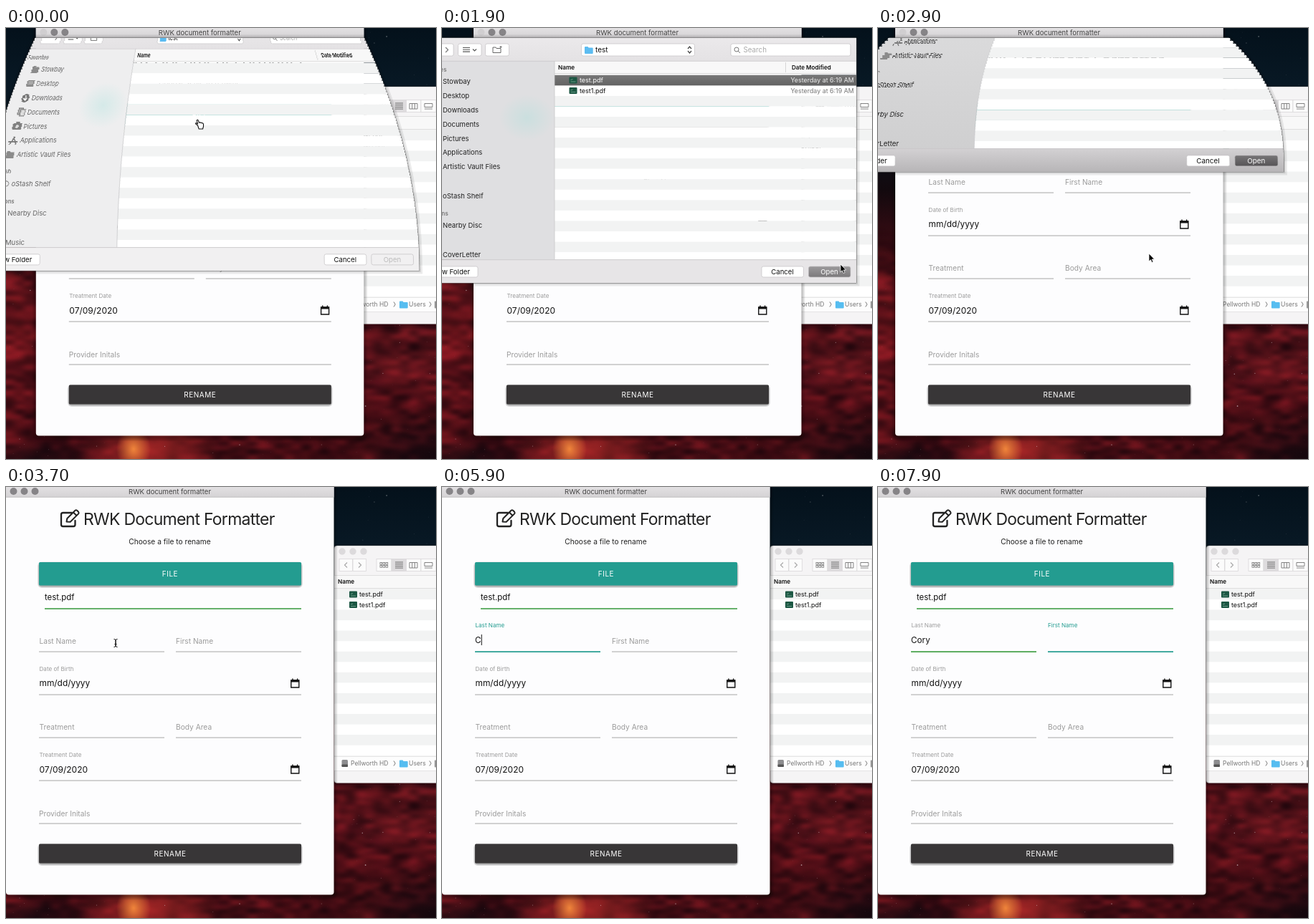
These frames come from a looping animation (600 by 602 pixels, 8000 ms). An HTML page with a canvas:

```html
<!DOCTYPE html>
<html lang="en">
<head>
<meta charset="utf-8">
<title>Document formatter</title>
<style>
html, body { margin: 0; width: 100%; height: 100%; overflow: hidden; background: #12090e; }
#sky, #stage { position: absolute; left: 0; top: 0; width: 600px; height: 602px; }
text { font-family: Inter, "Open Sans", sans-serif; white-space: pre; }
</style>
</head>
<body>
<canvas id="sky" width="600" height="602"></canvas>
<svg id="stage" viewBox="0 0 600 602"></svg>
<script>
const LOOP = 8000, STEP = 100, TOP = 14, SHEET_H = 342, SHEET_X = -33, SHEET_W = 611, STRIP = 4, SHIFT = 44;
const TEAL = '#239c90', GREEN = '#43a047', GREY = '#9b9b9b', INK = '#111';

const $ = id => document.getElementById(id);
const range = n => [...Array(n).keys()];
const rect = (x, y, w, h, fill, more = '') =>
  `<rect x="${x}" y="${y}" width="${w}" height="${h}" fill="${fill}" ${more}/>`;
const text = (x, y, s, size, fill = INK, more = '') =>
  `<text x="${x}" y="${y}" font-size="${size}" fill="${fill}" ${more}>${s}</text>`;
const path = (d, stroke, width = 1, more = '') =>
  `<path d="${d}" fill="none" stroke="${stroke}" stroke-width="${width}" ${more}/>`;
const circle = (x, y, r, fill, more = '') => `<circle cx="${x}" cy="${y}" r="${r}" fill="${fill}" ${more}/>`;
const gradient = (id, ...stops) => `<linearGradient id="${id}" x2="0" y2="1">` +
  stops.map((c, i) => `<stop offset="${i / (stops.length - 1)}" stop-color="${c}"/>`).join('') + '</linearGradient>';
const shade = (x, y, w, h, spread, alpha) => range(spread).map(i =>
  rect(x - i, y - i + spread / 2, w + 2 * i, h + 2 * i, '#000', `rx="${4 + i}" opacity="${alpha}"`)).join('');
const MIDDLE = 'text-anchor="middle"', BOLD = 'font-weight="600"';

const stripes = (x, y, w, bottom) => range(Math.ceil((bottom - y) / 14.55)).map(i => {
  const top = y + i * 14.55;
  return rect(x, top, w, Math.min(14.55, bottom - top), i % 2 ? '#fff' : '#f2f3f3');
}).join('');
const fileIcon = (x, y) => rect(x, y, 11, 9, '#1c5743', 'rx="1"') +
  path(`M${x + 2} ${y + 6.5}h7M${x + 2} ${y + 4}l3 -1`, '#7cab98', .8);
const folder = (x, y, fill) =>
  `<path d="M${x} ${y + 1}q0 -1 1 -1h3.5l1.2 1.5h5q1 0 1 1v6.5q0 1 -1 1h-9.7q-1 0 -1 -1z" fill="${fill}"/>`;
const chevron = (x, y, dx, color, w = 1.2) => path(`M${x} ${y - 3.5}l${dx} 3.5l${-dx} 3.5`, color, w);

function drawSky() {
  const ctx = $('sky').getContext('2d');
  let seed = 11;
  const rnd = () => (seed = seed * 16807 % 2147483647) / 2147483647;

  const space = ctx.createLinearGradient(0, 0, 0, 602);
  const tones = ['#04111b', '#081824', '#0b141d', '#12090e', '#3a0c13', '#6d1520', '#74141f', '#5b101a', '#380b13'];
  tones.forEach((c, i) => space.addColorStop(i / (tones.length - 1), c));
  ctx.fillStyle = space;
  ctx.fillRect(0, 0, 600, 602);

  const glow = (x, y, rx, ry, rgb, alpha) => {
    const g = ctx.createRadialGradient(0, 0, 0, 0, 0, 1);
    g.addColorStop(0, `rgba(${rgb},${alpha})`);
    g.addColorStop(1, `rgba(${rgb},0)`);
    ctx.save();
    ctx.translate(x, y);
    ctx.scale(rx, ry);
    ctx.fillStyle = g;
    ctx.fillRect(-1, -1, 2, 2);
    ctx.restore();
  };
  // Random cells, enlarged smoothly, make one octave of cloud.
  const cloud = (cells, rgb, alpha, top) => {
    const tile = document.createElement('canvas');
    tile.width = tile.height = cells;
    const c = tile.getContext('2d');
    for (let y = 0; y < cells; y++) for (let x = 0; x < cells; x++) {
      c.fillStyle = `rgba(${rgb},${(rnd() ** 1.5 * alpha * Math.min(1, 5 * y / cells)).toFixed(3)})`;
      c.fillRect(x, y, 1, 1);
    }
    ctx.imageSmoothingQuality = 'high';
    ctx.drawImage(tile, 0, top, 600, 602 - top);
  };
  glow(555, 450, 130, 75, '150,48,58', .6);
  glow(20, 400, 90, 90, '190,40,42', .45);
  for (const cells of [10, 22, 48]) {
    cloud(cells, '185,36,46', .4, 300);
    cloud(cells, '12,3,8', .6, 270);
  }
  glow(600, 600, 120, 80, '12,7,13', .8);
  glow(40, 602, 100, 30, '12,7,13', .8);
  glow(200, 590, 100, 48, '209,50,47', .7);
  glow(178, 588, 24, 30, '245,138,60', .95);
  for (let i = 0; i < 420; i++) {
    ctx.fillStyle = `rgba(229,223,227,${.15 + rnd() * .6})`;
    ctx.beginPath();
    ctx.arc(rnd() * 600, rnd() * 602, .25 + rnd() ** 5 * .8, 0, 7);
    ctx.fill();
  }
}

function finder() {
  const tool = (x, w, on) => rect(x, 100.5, w, 17, on ? '#dedcde' : '#fbfbfb', 'stroke="#dad8da" stroke-width=".8"');
  return `${shade(458, 82, 160, 331, 6, .06)}
    ${rect(458, 82, 160, 331.5, '#f5f4f5', 'rx="4" stroke="#888" stroke-width=".4"')}
    ${[469, 484, 499].map(x => circle(x, 90, 4.7, '#dcdadc')).join('')}
    ${tool(465, 18.5)}${tool(484, 18.5)}${tool(517, 21)}${tool(538, 20.5, true)}${tool(558.5, 20.5)}${tool(579, 21)}
    ${chevron(476, 109, -3.5, '#aaa')}${chevron(492, 109, 3.5, '#aaa')}
    ${range(6).map(i => rect(522 + i % 3 * 4, 105.5 + (i / 3 | 0) * 4, 2.7, 2.7, 'none', 'stroke="#777" stroke-width=".8"')).join('')}
    ${path('M543 105h11M543 107.7h11M543 110.4h11M543 113h11', '#666')}
    ${path('M563 105.5h11v7.5h-11zM566.7 105.5v7.5M570.4 105.5v7.5', '#777', .9)}
    ${path('M584 105.5h11v5h-11zM584 113h11', '#777', .9)}
    ${rect(458, 123, 142, 18.5, '#f8f8f8')}${path('M458 123.5h142M458 141.5h142', '#d5d5d5', .7)}
    ${text(463, 135, 'Name', 8.2, INK, BOLD)}
    ${stripes(458, 142.5, 142, 376)}
    ${fileIcon(479, 145.5)}${fileIcon(479, 160)}
    ${text(493, 153.3, 'test.pdf', 9)}${text(493, 167.8, 'test1.pdf', 9)}
    ${rect(458, 376, 142, 20, '#fdfdfd')}${path('M458 376.5h142M458 396.5h142', '#ddd', .7)}
    ${rect(468.5, 381, 8.5, 10, '#8d8d8f', 'rx="1.5"')}${rect(468.5, 387.5, 8.5, 3.5, '#555', 'rx="1"')}
    ${text(481, 389.3, 'Pellworth HD', 8.5, '#777')}${chevron(541, 386, 2.2, '#777', 1)}
    ${folder(549, 381.5, '#56bdf0')}${text(562, 389.3, 'Users', 8.6, '#777')}${chevron(591, 386, 2.2, '#777', 1)}
    ${folder(598, 381.5, '#999')}`;
}

const calendar = y => `<g transform="translate(397 ${y})">${path('M.8 2.5h11v10h-11z', INK, 1.4)}
  ${rect(.5, 2, 11.6, 3, INK)}${path('M3 0v3M9.6 0v3', INK, 1.4)}</g>`;

function formWindow() {
  const line = (x, w, y, id = '') => rect(x, y - .4, w, .9, GREY, id && `id="${id}"`);
  const hint = (x, y, s, more) => text(x, y, s, 10.2, GREY, more);
  const label = (y, s) => text(46.5, y, s, 8.1, GREY);
  const button = (y, h, fill, s) => shade(46, y, 366, h, 3, .12) + rect(46, y, 366, h, fill, 'rx="1.5"') +
    text(229, y + h / 2 + 3.6, s, 10, '#fff', MIDDLE + ' letter-spacing=".5"');
  return `<g id="win">${shade(0, -6, 457.5, 575, 6, .06)}${rect(0, -6, 457.5, 575.5, '#fdfdfe', 'rx="4"')}
    ${rect(0, -1, 457.5, 15, 'url(#bar)')}${path('M0 14.2h457.5', '#b4b2b4', .8)}
    ${circle(10.5, 6, 5, '#868487', 'id="closeDot"')}${circle(25.5, 6, 5, '#868487')}${circle(40.5, 6, 5, '#868487')}
    ${text(228.5, 9.7, 'RWK document formatter', 9.6, '#444', MIDDLE)}
    ${path('M92 36H79.5q-2.5 0 -2.5 2.5v14q0 2.5 2.5 2.5h14.5q2.5 0 2.5 -2.5V47', '#222', 2.3, 'stroke-linecap="round"')}
    ${path('M84.5 48.5l.8 -4.5 11.2 -11.2q1.3 -1 2.6 0l2 2q1 1.3 0 2.6l-11.4 11.3zM94 35.5l4.5 4.5', '#222', 2, 'stroke-linejoin="round"')}
    ${text(108, 52.5, 'RWK Document Formatter', 23, '#222', 'letter-spacing="-.75"')}
    ${text(228.5, 80, 'Choose a file to rename', 10.2, '#222', MIDDLE)}
    ${button(105, 32.5, TEAL, 'FILE')}
    ${text(54, 157.5, 'test.pdf', 11.4, INK, 'id="fileName"')}${rect(54, 169.2, 358, 1.6, GREEN, 'id="fileLine"')}
    ${hint(46.5, 219, 'Last Name', 'id="lastLabel"')}${line(46, 175, 230, 'lastLine')}${text(46, 217.8, '', 11.7, INK, 'id="lastValue"')}
    ${hint(237, 219, 'First Name', 'id="firstLabel"')}${line(237, 175, 230, 'firstLine')}
    ${rect(46, 206, 1, 15, INK, 'id="caret"')}
    ${label(257, 'Date of Birth')}${text(46.5, 278.3, 'mm/dd/yyyy', 11.9)}${calendar(267.5)}${line(46, 366, 290)}
    ${hint(46.5, 339.3, 'Treatment')}${line(46, 175, 350)}${hint(237, 339.3, 'Body Area')}${line(237, 175, 350)}
    ${label(377.3, 'Treatment Date')}${text(46.5, 398.5, '07/09/2020', 12)}${calendar(387.5)}${line(46, 366, 410)}
    ${hint(46, 459.5, 'Provider Initals')}${line(46, 366, 470)}
    ${button(498.5, 27, '#383637', 'RENAME')}</g>`;
}

function sheet() {
  const key = (x, y, w, h, more = '') => rect(x, y, w, h, '#fff', `rx="2.5" stroke="#c3c1c3" stroke-width=".7" ${more}`);
  const places = ['Stowbay', 'Desktop', 'Downloads', 'Documents', 'Pictures', 'Applications', 'Artistic Vault Files'];
  const place = (y, s, more = '') => text(1, y + 3.3, s, 9.5, 'inherit', more);
  const head = (x, y, s) => text(x, y + 3, s, 8.2, '#777', BOLD);
  const icons = [folder(-15, 70, '#8b8b8b'),
    rect(-15, 90, 12, 9, '#8b8b8b', 'rx="1"') + path('M-13 92.5h8M-13 95h8', '#eee', .8),
    circle(-9, 115, 6, '#777') + path('M-9 111v7M-12 115l3 3 3 -3', '#fff', 1.4),
    rect(-14, 129, 7, 9, '#aaa', 'stroke="#777"') + rect(-10, 131, 7, 9, '#ddd', 'stroke="#777"'),
    rect(-16, 150, 14, 9, '#808080', 'rx="1.5"') + rect(-12, 148, 6, 4, '#808080') + circle(-9, 154.5, 2.5, '#ddd'),
    path('M-14 180l6 -11M-4 180l-6 -11M-16 176h14', '#777', 1.6), folder(-15, 189, '#8b8b8b'),
    path('M-13 238q-3 0 -3 -3t4 -3q2 -4 5 -1q4 0 4 4q0 3 -3 3z', '#888')].join('');
  const row = ([s, y], i) => fileIcon(177.5, y - 4.5) + text(192, y + 3.3, s, 9, INK, `id="name${i}"`) +
    text(486.5, y + 3.3, 'Yesterday at 6:19 AM', 8.9, '#777', `id="when${i}"`);
  return `<svg id="sheet" x="${SHEET_X}" y="${TOP}" width="${SHEET_W}" height="${SHEET_H}" viewBox="${SHEET_X} ${TOP} ${SHEET_W} ${SHEET_H}">
    ${rect(SHEET_X, TOP, SHEET_W, 32, 'url(#tools)')}
    ${key(-20, 22, 36, 17)}${chevron(5, 30.5, 3.5, '#777')}
    ${key(22.5, 22, 32.5, 17)}${path('M29 27.5h10M29 30.3h10M29 33.1h10M43 29.5l2.5 2.5 2.5 -2.5', '#555', 1.1)}
    ${key(60.5, 22, 33, 17)}${path('M71 27h4l1 1.5h6v6h-11zM82 25v3M80.5 26.5h3', '#666')}
    ${key(194.5, 22, 158, 17)}${folder(199, 26, '#5cbcf1')}${text(214, 34, 'test', 10)}
    ${path('M343 29l2.5 -3 2.5 3M343 32l2.5 3 2.5 -3', '#444', 1.2)}
    ${key(403, 22, 167, 17)}${circle(411, 30, 3, 'none', 'stroke="#777"')}${path('M413 32l3 3', '#777')}${text(420.5, 34, 'Search', 9.8, '#aaa')}
    ${rect(SHEET_X, 46, 190, 277.5, '#dfdfe1', 'id="side"')}${rect(80, 93, 77, 64, 'url(#tint)')}
    ${head(-30, 58, 'Favorites')}${head(-30, 217, 'oStash')}${head(-30, 259, 'Locations')}${icons}
    <g id="places">${places.map((s, i) => place(75 + i * 19.83, s)).join('')}
    ${place(235, 'oStash Shelf')}${place(276, 'Nearby Disc')}${place(317, 'CoverLetter', 'id="lastPlace"')}</g>
    ${rect(157, 46, 421, 19.5, '#f8f8f8')}${path('M157 63.5h421', '#d0d0d0', .7)}${path('M479.5 48v14', '#ccc', .8)}
    ${path(`M${SHEET_X} 46.3h${SHEET_W}`, '#c9c7c9', .8)}
    ${text(162, 58.2, 'Name', 8.2, INK, BOLD)}${text(488, 58.2, 'Date Modified', 8.1, INK, BOLD)}
    ${stripes(157, 65.8, 421, 323.5)}${rect(157, 65.8, 421, 14.5, 'url(#picked)', 'id="pick"')}
    <g id="files">${[['test.pdf', 73], ['test1.pdf', 87.5]].map(row).join('')}</g>
    ${path('M157 46v277.5', '#c8c8ca', .8)}
    ${rect(SHEET_X, 323.5, SHEET_W, 32.5, '#e7e5e7', 'id="foot"')}${path(`M${SHEET_X} 323.7h${SHEET_W}`, '#c4c2c4', .8)}
    ${key(-22, 333, 72, 15)}${text(39, 344, 'New Folder', 9.6, INK, 'text-anchor="end"')}
    ${key(446, 333, 58.5, 15)}${text(475, 344, 'Cancel', 9.6, INK, MIDDLE)}
    ${key(511.5, 333, 58.5, 15, 'id="openKey"')}${text(540.5, 344, 'Open', 9.6, '#bbb', MIDDLE + ' id="openText"')}</svg>`;
}

function build() {
  $('stage').innerHTML = `<defs>
    ${gradient('bar', '#e3e1e3', '#d5d3d5')}${gradient('tools', '#ebe9eb', '#e4e2e4')}${gradient('picked', '#777', '#636363')}
    ${gradient('keyOn', '#9b999b', '#7b797b')}${gradient('keyDown', '#777577', '#565456')}
    ${gradient('footDark', '#d3d1d3', '#b7b5b7')}${gradient('sideDark', '#dededf', '#d9d9da', '#cfcfd0')}
    <radialGradient id="tint"><stop stop-color="#9adfd9" stop-opacity=".3"/><stop offset="1" stop-color="#9adfd9" stop-opacity="0"/></radialGradient></defs>
    ${finder()}${formWindow()}
    <g id="edge">${path('', '#000', 9, 'opacity=".08"')}${path('', '#000', 4, 'opacity=".12"')}${path('', '#777', 1)}</g>
    ${sheet()}<g id="warp"></g>
    <g id="hand"><path d="M2.5 8L.3 6.5Q-1.2 5 .3 4.6L2.6 6 1.2 1.6Q1.3 -.3 3 .6L4.5 4.3Q6 3.3 6.8 4.5 8 3.8 8.7 5 10.3 4.5 10.5 6.5V9.5L9.5 13H4.2Z" fill="#fff" stroke="#111" stroke-width="1.1" stroke-linejoin="round"/></g>
    <g id="arrow"><path d="M0 0V11L2.5 8.7 4.2 12.5 6 11.7 4.4 8H7.7Z" fill="#000" stroke="#fff" stroke-width=".8"/></g>
    <g id="beam">${path('M-2.5 -5.5q2.5 0 2.5 1.5v8q0 1.5 -2.5 1.5M2.5 -5.5q-2.5 0 -2.5 1.5v8q0 1.5 2.5 1.5M-1.5 1.5h3', INK)}</g>`;
}

const set = (id, attrs) => {
  for (const k in attrs) {
    const value = String(attrs[k]);
    if ($(id).getAttribute(k) !== value) $(id).setAttribute(k, value);
  }
};
const show = (id, on) => set(id, { display: on ? 'inline' : 'none' });
const ramp = (t, from, length) => Math.min(1, Math.max(0, (t - from) / length));
const ease = u => u * u * (3 - 2 * u);
const mix = (a, b, u) => a + (b - a) * u;

const CLOSE = 2764, FOCUS_LAST = 4000, FOCUS_FIRST = 7400;
const NAME = 'Cory', KEYS = [5900, 6300, 6700, 7100];
const TRACK = [[0, 265, 128], [200, 265, 128], [900, 222, 72], [1350, 222, 72], [1800, 556, 330],
  [2450, 556, 330], [2900, 378, 315], [3500, 153, 218], [LOOP, 153, 218]];

function pointer(t) {
  const i = TRACK.findIndex(k => k[0] > t), a = TRACK[i - 1], b = TRACK[i];
  const u = ease((t - a[0]) / (b[0] - a[0]));
  return [mix(a[1], b[1], u), mix(a[2], b[2], u)];
}

// The sheet slides out of the title bar, pinched to the window width at its top.
function drawSheet(open) {
  const hidden = 1 - open, bottom = TOP + SHEET_H * open, cx = 228.5 + SHIFT * open;
  const half = y => {
    const u = Math.min(1, (y - TOP) / (bottom - TOP));
    const flare = 1 - (1 - u) ** (1.9 + 1.6 * hidden);
    return SHEET_W / 2 * (open === 1 ? 1 : mix(.748 + .06 * hidden, 1 + .06 * hidden, flare));
  };
  show('sheet', open === 1);
  show('edge', open > 0);
  $('warp').innerHTML = '';
  if (open === 0) return;
  const ys = range(25).map(i => mix(TOP, bottom, (i / 24) ** 2));
  const sides = [...ys.map(y => [cx + half(y), y]), ...ys.reverse().map(y => [cx - half(y), y])];
  for (const p of $('edge').children) p.setAttribute('d', `M${sides.join('L')}z`);
  if (open === 1) return;

  const pieces = $('sheet').innerHTML.replace(/ id="[^"]*"/g, '');
  $('warp').innerHTML = `<defs><g id="pieces">${pieces}</g></defs>` + range(Math.ceil((bottom - TOP) / STRIP)).map(i => {
    const y = TOP + i * STRIP, h = Math.min(STRIP, bottom - y), w = half(y + h / 2);
    return `<svg x="${cx - w}" y="${y}" width="${2 * w}" height="${h}" preserveAspectRatio="none"
      viewBox="${SHEET_X} ${y + SHEET_H * hidden} ${SHEET_W} ${h}"><use href="#pieces"/></svg>`;
  }).join('');
}

function drawField(id, u, color, lineColor) {
  set(id + 'Label', { y: mix(219, 196.3, u), 'font-size': mix(10.2, 8.1, u), fill: color });
  set(id + 'Line', { y: u ? 229.3 : 229.6, height: u ? 1.7 : .9, fill: lineColor });
}

let shownOpen = -1;
function draw(t) {
  const open = t < CLOSE ? mix(.95, 1, ramp(t, 0, 100)) : 1 - ease(ramp(t, CLOSE, 290));
  const fresh = t < 100, picked = t >= 1250, closing = t >= CLOSE;
  set('win', { transform: `translate(${SHIFT * open})` });
  set('closeDot', { fill: open > 0 ? '#d0ced0' : '#868487' });

  show('files', t >= 150);
  show('pick', picked);
  set('name0', { fill: picked ? '#fff' : INK });
  set('when0', { fill: picked ? '#eee' : '#777' });
  set('side', { fill: fresh ? '#eeeeef' : closing ? 'url(#sideDark)' : '#dfdfe1' });
  set('foot', { fill: fresh ? '#f1f0f1' : closing ? 'url(#footDark)' : '#e7e5e7' });
  set('openKey', { fill: closing ? 'url(#keyDown)' : picked ? 'url(#keyOn)' : '#f1f0f1' });
  set('openText', { fill: picked ? '#fff' : '#bbb' });
  set('places', { fill: fresh ? '#666' : '#222' });
  $('lastPlace').textContent = fresh ? 'Music' : 'CoverLetter';
  if (open !== shownOpen) drawSheet(shownOpen = open);
  show('fileName', closing);
  show('fileLine', closing);

  const onLast = t >= FOCUS_LAST, onFirst = t >= FOCUS_FIRST, lastActive = onLast && !onFirst;
  drawField('last', ease(ramp(t, FOCUS_LAST, 200)), lastActive ? TEAL : GREY, onFirst ? GREEN : lastActive ? TEAL : GREY);
  drawField('first', ease(ramp(t, FOCUS_FIRST, 200)), onFirst ? TEAL : GREY, onFirst ? TEAL : GREY);
  const typed = KEYS.filter(k => t >= k).length;
  $('lastValue').textContent = NAME.slice(0, typed);
  const blinkFrom = onFirst ? FOCUS_FIRST : typed ? KEYS[typed - 1] : FOCUS_LAST;
  show('caret', onLast && (t - blinkFrom) % 1000 < 500);
  set('caret', { x: onFirst ? 237 : 46.2 + (typed ? $('lastValue').getComputedTextLength() : 0) });

  const [x, y] = pointer(t);
  const shape = t < 150 ? 'hand' : t < 3350 ? 'arrow' : t < KEYS[0] ? 'beam' : '';
  for (const id of ['hand', 'arrow', 'beam']) {
    show(id, id === shape);
    set(id, { transform: `translate(${x} ${y})` });
  }
}

drawSky();
build();
const start = performance.now();
let shownStep = -1;
function tick() {
  const step = Math.floor((performance.now() - start) % LOOP / STEP);
  if (step !== shownStep) draw((shownStep = step) * STEP);
  requestAnimationFrame(tick);
}
tick();
</script>
</body>
</html>
```
